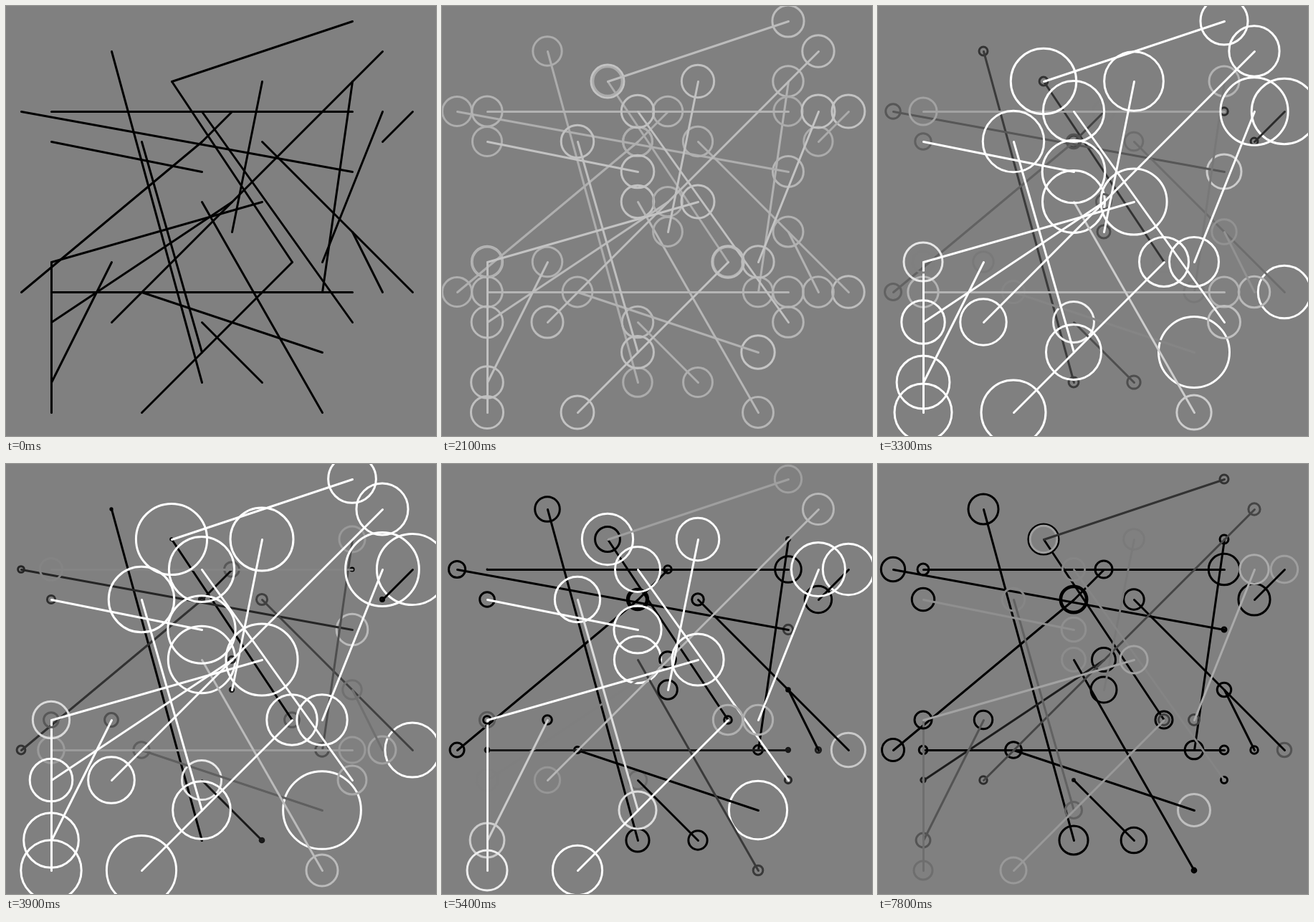
An HTML page with a canvas for the animation above (8000 ms loop, 600 by 600 pixels).

```html
<!DOCTYPE html>
<html lang="en">
<head>
<meta charset="utf-8">
<title>Lines and rings</title>
<style>
  html, body { margin: 0; width: 100%; height: 100%; overflow: hidden; background: #808080; }
  canvas { display: block; width: 600px; height: 600px; }
</style>
</head>
<body>
<canvas id="stage" width="600" height="600"></canvas>
<script>
const ctx = document.getElementById('stage').getContext('2d');
const LOOP = 8000, STEP = 300, HOLD = 600, STEPS = 18;

// [head, tail, tail level], from the darkest head to the brightest.
// An end is a grid cell: column * 100 + row.
const links = [
  [1204, 1303, 25], [502, 908, -16], [612, 301, -28], [604, 703, -16],
  [812, 610, 2], [3, 1105, -4], [9, 604, -23], [804, 1309, 13],
  [1009, 1102, -8], [409, 1011, 30], [1107, 1209, -7], [103, 1103, -29],
  [109, 1109, -8], [1013, 606, 22], [110, 706, -22], [1100, 502, 25],
  [1201, 310, 7], [112, 308, -17], [611, 404, 21], [113, 108, 0],
  [802, 707, -24], [603, 1110, -6], [605, 104, -21], [413, 908, 10],
  [806, 108, -16], [1203, 1008, 10]
];

// Head levels follow one S-curve through the order of the links.
function headLevel(rank) {
  const u = (rank - 13.45) / 12;
  return Math.sign(u) * 27.5 * Math.abs(u) ** 0.6;
}

const place = cell => [21 + 42 * Math.floor(cell / 100), 21 + 42 * (cell % 100)];

// All levels swell together, drift apart, then fade back to nothing.
function levelAt(t) {
  const k = Math.min(STEPS, Math.max(0, Math.floor((t - HOLD) / STEP)));
  if (k === 0) return () => 0;
  const swell = 27 * (1 - ((k - 9) / 9) ** 2);
  const spread = 1 / (1 + Math.exp(7.9 - k));
  const fade = 1 - Math.max(0, Math.floor((t - 7200) / STEP)) / 8;
  return level => (swell + spread * level) * fade;
}

function shade(v) {
  const g = Math.round(Math.min(255, Math.max(0, v * 8.5)));
  return `rgb(${g},${g},${g})`;
}

function ring(cell, v) {
  if (v === 0) return;
  ctx.strokeStyle = shade(v);
  ctx.beginPath();
  ctx.arc(...place(cell), Math.abs(v), 0, Math.PI * 2);
  ctx.stroke();
}

function line(from, to, v) {
  const [x1, y1] = place(from), [x2, y2] = place(to);
  ctx.strokeStyle = shade(v);
  ctx.beginPath();
  ctx.moveTo(x1 + 0.5, y1 + 0.5);
  ctx.lineTo(x2 + 0.5, y2 + 0.5);
  ctx.stroke();
}

function draw(t) {
  const level = levelAt(t);
  ctx.fillStyle = '#808080';
  ctx.fillRect(0, 0, 600, 600);
  ctx.lineWidth = 3;
  ctx.lineCap = 'round';
  links.forEach(([head, tail, tailLevel], rank) => {
    const v = level(headLevel(rank));
    ring(head, v);
    ring(tail, level(tailLevel));
    line(head, tail, v);
  });
}

const start = performance.now();
function tick() {
  draw((performance.now() - start) % LOOP);
  requestAnimationFrame(tick);
}
tick();
</script>
</body>
</html>
```
